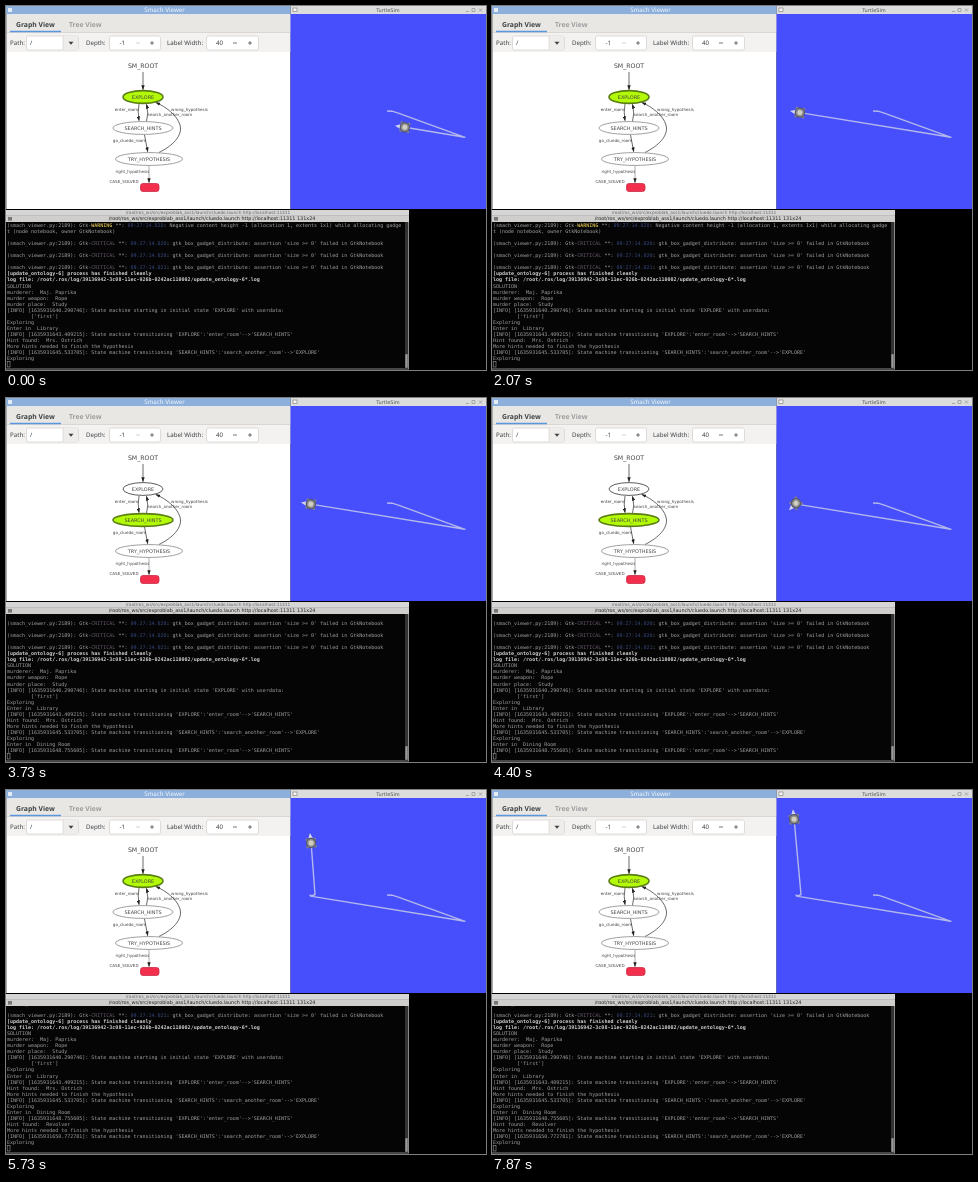
An HTML page that plays this animation: 480x364 px, repeating every 8 s.

```html
<!DOCTYPE html>
<html lang="en">
<head>
<meta charset="utf-8">
<title>State machine demo</title>
<style>
html, body { margin: 0; width: 100%; height: 100%; overflow: hidden; background: #000; }
svg { display: block; width: 480px; height: 364px; text-rendering: geometricPrecision; }
text { white-space: pre; }
.ui { font: 6.2px "Noto Sans", "Open Sans", sans-serif; fill: #3c4042; }
.tab { font-weight: bold; font-size: 6.8px; }
.graph { font: 4.1px "DejaVu Sans", sans-serif; text-anchor: middle; fill: #444; }
.node { font-size: 4.9px; }
.bar { font: 4.3px "DejaVu Sans", sans-serif; text-anchor: middle; }
.edge { fill: none; stroke: #444; stroke-width: .8; marker-end: url(#tip); }
.box { fill: #fff; stroke: #d6d2ce; stroke-width: .8; }
.mark { fill: none; stroke: #555; stroke-width: .8; }
ellipse { fill: #fff; stroke: #888; stroke-width: .8; }
#explore { stroke: #333; }
ellipse.on, #explore.on { fill: #b2fa08; stroke: #5a7d14; stroke-width: 1.6; }
#log { font: 5px "DejaVu Sans Mono", monospace; fill: #a2a2a2; }
</style>
</head>
<body>
<svg viewBox="0 0 480 364">
  <defs>
    <marker id="tip" viewBox="0 0 6 4" markerWidth="5" markerHeight="3.6" refX="5" refY="2" orient="auto" markerUnits="userSpaceOnUse"><path d="M0 0L6 2L0 4z" fill="#222"/></marker>
    <clipPath id="screen"><rect x="0" y="216" width="399" height="146"/></clipPath>
    <clipPath id="sea"><rect x="285" y="8" width="195" height="195"/></clipPath>
  </defs>

  <!-- Graph viewer -->
  <rect width="284.5" height="203" fill="#fff"/>
  <rect width="284.5" height="8.5" fill="#8cafdc"/>
  <text class="ui" x="158.5" y="6" text-anchor="middle" font-weight="bold" style="font-size:6.2px;fill:#f4f7fb">Smach Viewer</text>
  <rect x="2" y="2" width="4" height="4" fill="#e4ebf4"/>
  <rect y="8.5" width="284.5" height="37.5" fill="#f3f2f1"/>
  <rect y="8.5" width="284.5" height="18" fill="#e9e7e4"/>
  <path d="M0 26.5H284.5" stroke="#d6d1cc" stroke-width=".8"/>
  <path d="M4 25.5H55" stroke="#5b97dc" stroke-width="1.3"/>
  <path d="M.5 8V203" stroke="#aaa"/>
  <g class="ui">
    <text class="tab" x="10" y="21.2">Graph View</text>
    <text class="tab" x="63" y="21.2" style="fill:#9c9e9e">Tree View</text>
    <text x="4" y="39">Path:</text>
    <text x="80" y="39">Depth:</text>
    <text x="161" y="39">Label Width:</text>
    <g class="box"><rect x="20.5" y="30" width="52" height="14" rx="2"/><rect x="103.5" y="30" width="51" height="14" rx="2"/><rect x="200.5" y="30" width="52" height="14" rx="2"/></g>
    <rect x="57" y="30.4" width="15" height="13.2" fill="#eeedeb"/>
    <path d="M57 30v14" stroke="#d5d0cc" stroke-width=".6"/>
    <path d="M62.5 35.8h5l-2.5 3z"/>
    <path class="mark" d="M130 37h4" style="stroke:#ccc"/>
    <path class="mark" d="M144 37h4M146 35v4M227 37h4M242 37h4M244 35v4"/>
    <text x="24" y="39">/</text>
    <text x="113.5" y="39">-1</text>
    <text x="210" y="39">40</text>
  </g>

  <g class="graph">
    <path class="edge" d="M137 66V83.5"/>
    <path class="edge" d="M133 98Q131.5 106 133 114.5"/>
    <path class="edge" d="M140.5 115.5Q143 107 140.5 98.5"/>
    <path class="edge" d="M138.5 129L141.7 145.5"/>
    <path class="edge" d="M153 146.5C166 140 177 130 174 119C171 109 160 101 150 96.5"/>
    <path class="edge" d="M143 160V176.5" style="stroke:#999"/>
    <ellipse id="explore" cx="137" cy="91" rx="20" ry="6.4"/>
    <ellipse id="search" cx="137" cy="122" rx="30" ry="6.4"/>
    <ellipse cx="143" cy="153" rx="33.5" ry="6.4"/>
    <rect x="134.5" y="177.5" width="18.5" height="8" rx="2.5" fill="#f2304d" stroke="#c92c46" stroke-width=".8"/>
    <text x="137" y="62.2" style="font-size:6.2px">SM_ROOT</text>
    <g class="node">
      <text x="137" y="92.6">EXPLORE</text>
      <text x="137" y="123.6">SEARCH_HINTS</text>
      <text x="143" y="154.6">TRY_HYPOTHESIS</text>
    </g>
    <text x="120.5" y="105.2">enter_room</text>
    <text x="183.5" y="105">wrong_hypothesis</text>
    <text x="164" y="109.5">search_another_room</text>
    <text x="123.5" y="136.3">go_cluedo_room</text>
    <text x="126.5" y="167">right_hypothesis</text>
    <text x="118" y="176.5">CASE_SOLVED</text>
  </g>

  <!-- Turtle window -->
  <rect x="285" width="195" height="8" fill="#dcdcdc"/>
  <rect x="287" y="2" width="4" height="3.5" fill="#f4f4f4" stroke="#777" stroke-width=".6"/>
  <text class="bar" x="382" y="5.6" fill="#555" style="font-size:5px">TurtleSim</text>
  <path class="mark" d="M460 5.5h3M466 2.5h3v3h-3zM473 2.5l3 3m0-3l-3 3" style="stroke:#888;stroke-width:.6"/>
  <rect x="284.5" y="8" width="195.5" height="195" fill="#464ffb"/>
  <g clip-path="url(#sea)">
    <polyline id="trail" fill="none" stroke="#b3b7ec" stroke-width="1.4" stroke-linejoin="round"/>
    <g id="turtle">
      <g fill="#7c7e90"><circle cx="3.7" cy="4" r="1.4"/><circle cx="3.7" cy="-4" r="1.4"/><circle cx="-3.7" cy="4" r="1.4"/><circle cx="-3.7" cy="-4" r="1.4"/></g>
      <path d="M4.6 -2.3L10 0L4.6 2.3z" fill="#d4d6ee"/>
      <circle r="4.6" fill="#8f8f8c" stroke="#55566a" stroke-width="1.2"/>
      <circle r="2.5" fill="#cfcec2"/>
    </g>
  </g>

  <!-- Terminal -->
  <rect y="204" width="403" height="159.5" fill="#8a8a8a"/>
  <rect y="204" width="403" height="5.5" fill="#d6d6d6"/>
  <rect y="209.5" width="403" height="6.5" fill="#cfcecd"/>
  <rect x="2" y="211" width="4" height="3.6" fill="#777"/>
  <text class="bar" x="202" y="207.8" fill="#666">/root/ros_ws/src/exproblab_ass1/launch/cluedo.launch http://localhost:11311</text>
  <text class="bar" x="206" y="214.4" fill="#222" style="font-size:4.88px">/root/ros_ws/src/exproblab_ass1/launch/cluedo.launch http://localhost:11311 131x24</text>
  <rect y="216" width="402" height="146.5" fill="#050505"/>
  <rect x="399" y="216" width="3" height="146.5" fill="#333"/>
  <rect x="399.3" y="348" width="2.4" height="14" rx="1" fill="#999"/>
  <g clip-path="url(#screen)"><g id="log"></g></g>
  <rect x="1.2" y="355.6" width="2.8" height="5.4" fill="none" stroke="#999" stroke-width=".6"/>
</svg>
<script>
const $ = id => document.getElementById(id);
const PITCH = 6.08;

const gtk = (level, color, ms, message) =>
  `(smach_viewer.py:2189): Gtk-<tspan fill="${color}">${level}</tspan> **: ` +
  `<tspan fill="#3a4a80">09:27:14.${ms}</tspan>: ${message}`;
const critical = ms => gtk('CRITICAL', '#685a6c', ms,
  "gtk_box_gadget_distribute: assertion 'size &gt;= 0' failed in GtkNotebook");
const bold = s => `<tspan fill="#d2d2d2" font-weight="bold">${s}</tspan>`;
const info = (stamp, message) => `[INFO] [16359316${stamp}]: State machine ${message}`;
const enter = stamp => info(stamp, "transitioning 'EXPLORE':'enter_room'--&gt;'SEARCH_HINTS'");
const leave = stamp => info(stamp, "transitioning 'SEARCH_HINTS':'search_another_room'--&gt;'EXPLORE'");
const more = 'More hints needed to finish the hypothesis';

const lines = [
  gtk('WARNING', '#c9b04a" font-weight="bold', '020', 'Negative content height -1 (allocation 1, extents 1x1) while allocating gadge'),
  't (node notebook, owner GtkNotebook)',
  '', critical('020'), '', critical('020'), '', critical('021'),
  bold('[update_ontology-6] process has finished cleanly'),
  bold('log file: /root/.ros/log/39136942-3c08-11ec-926b-0242ac110002/update_ontology-6*.log'),
  'SOLUTION',
  'murderer:  Maj. Paprika',
  'murder weapon:  Rope',
  'murder place:  Study',
  info('40.290746', "starting in initial state 'EXPLORE' with userdata:"),
  "        ['first']",
  'Exploring',
  'Enter in  Library',
  enter('43.409215'),
  'Hint found:  Mrs. Ostrich',
  more,
  leave('45.533705'),
  'Exploring',
  'Enter in  Dining Room',
  enter('48.755605'),
  'Hint found:  Revolver',
  more,
  leave('50.772781'),
  'Exploring'
];
$('log').innerHTML = lines.map((s, i) =>
  `<text x="1" y="${220.7 + i * PITCH}">${s}</text>`).join('');
const rows = [...$('log').children];

// Turning on the spot between the two runs: time, x, y, heading.
const turn = [
  [4.2, 304.6, 106.1, 189], [4.4, 304, 105.2, 135], [4.67, 306, 106, 80],
  [4.8, 309, 104.5, 5], [5.07, 309, 104.5, 5]
];
const RATE = 1.62;

function pose(t) {
  if (t < 4.2) {
    const d = 94.4 * Math.exp(-RATE * t);
    return [304.6 + d, 106.1 + .161 * d, 189];
  }
  if (t >= 5.07) {
    const d = 24.5 * Math.exp(-RATE * (t - 5.73));
    return [302 + .127 * d, 28.5 + d, -97];
  }
  const i = turn.findIndex(k => k[0] > t), a = turn[i - 1], b = turn[i];
  const u = (t - a[0]) / (b[0] - a[0]);
  return [1, 2, 3].map(j => a[j] + (b[j] - a[j]) * u);
}

function draw(now) {
  const t = now / 1000 % 8;
  const [x, y, heading] = pose(t);
  $('turtle').setAttribute('transform', `translate(${x} ${y}) rotate(${heading})`);
  const passed = turn.filter(k => k[0] <= t).map(k => [k[1], k[2]]);
  $('trail').setAttribute('points',
    [[381, 105], [386, 105.2], [393, 107.3], [459, 131.3], ...passed, [x, y]].join(' '));

  const searching = t >= 2.95 && t < 5.07;
  $('explore').classList.toggle('on', !searching);
  $('search').classList.toggle('on', searching);

  // Rows past the prompt stay hidden until they are printed.
  const scroll = t < 2.95 ? 0 : searching ? 2 : 6;
  $('log').setAttribute('transform', `translate(0 ${-scroll * PITCH})`);
  rows.forEach((row, i) => row.setAttribute('visibility', i < scroll + 23 ? 'visible' : 'hidden'));
  requestAnimationFrame(draw);
}
requestAnimationFrame(draw);
</script>
</body>
</html>
```
